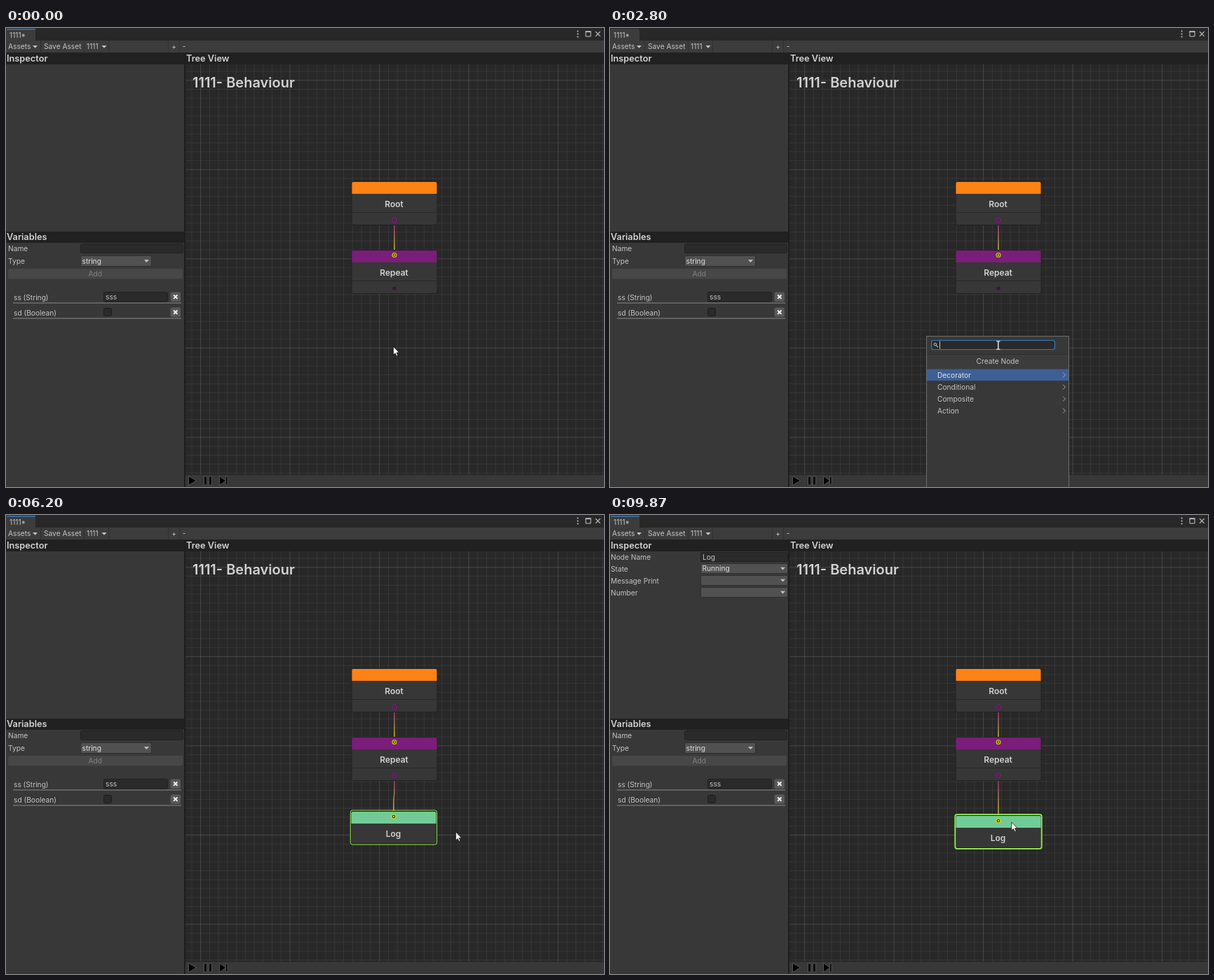
Animation, 853 px wide and 656 px high, one loop 9.94 s. Source, as an HTML page with a canvas:

```html
<!DOCTYPE html>
<html lang="en">
<head>
<meta charset="utf-8">
<title>Behaviour tree editor</title>
<style>
html, body { margin: 0; width: 853px; height: 656px; overflow: hidden; background: #383838; }
canvas { display: block; }
</style>
</head>
<body>
<canvas id="stage" width="853" height="656"></canvas>
<script>
const ctx = document.getElementById('stage').getContext('2d');
const LOOP = 9940, TICK = 200 / 3;
const PURPLE = '#861a86', YELLOW = '#c9da12', GREEN = '#8ce04e';

// Pointer and Log port positions: [time, x, y]
const POINTER = [
  [263, 552.5, 455.3], [930, 550.5, 374], [1003, 550.5, 374], [1270, 550.5, 378],
  [1730, 552, 444], [1803, 552, 444], [2070, 553, 455], [5533, 553, 455],
  [5730, 679, 450], [5800, 679, 450], [6670, 594, 457], [6870, 594, 457],
  [7200, 594.5, 459], [7470, 602.5, 471], [8400, 602.5, 471], [8470, 603, 472],
  [8670, 603, 476], [8870, 603, 476], [9070, 599, 466], [9600, 599, 466], [9870, 572.5, 438.8]
];
const LOG = [
  [7200, 553, 431], [7470, 561, 442], [8400, 561, 442], [8470, 561.5, 443],
  [8670, 561.5, 447], [8870, 561.5, 447], [9070, 554, 437]
];

function at(keys, t) {
  if (t <= keys[0][0]) return keys[0].slice(1);
  const i = keys.findIndex(k => k[0] > t);
  if (i < 0) return keys[keys.length - 1].slice(1);
  const [t0, x0, y0] = keys[i - 1], [t1, x1, y1] = keys[i];
  let p = (t - t0) / (t1 - t0);
  if (t1 - t0 > 400) p = p * p * (3 - 2 * p);
  return [x0 + (x1 - x0) * p, y0 + (y1 - y0) * p];
}

function box(x, y, w, h, fill, stroke, r = 0, lw = 1) {
  ctx.beginPath();
  ctx.roundRect(x, y, w, h, r);
  if (fill) { ctx.fillStyle = fill; ctx.fill(); }
  if (stroke) { ctx.strokeStyle = stroke; ctx.lineWidth = lw; ctx.stroke(); }
}

function text(s, x, y, { size = 10.2, weight = 400, color = '#c4c4c4', align = 'left' } = {}) {
  ctx.font = `${weight} ${size}px Inter, sans-serif`;
  ctx.fillStyle = color;
  ctx.textAlign = align;
  ctx.fillText(s, x, y);
}

function path(points, { fill, stroke, lw = 1, close = false }) {
  ctx.beginPath();
  points.forEach(([x, y]) => ctx.lineTo(x, y));
  if (close) ctx.closePath();
  if (fill) { ctx.fillStyle = fill; ctx.fill(); }
  if (stroke) { ctx.strokeStyle = stroke; ctx.lineWidth = lw; ctx.stroke(); }
}

const line = (x0, y0, x1, y1, stroke, lw = 1) => path([[x0, y0], [x1, y1]], { stroke, lw });

function cross(x, y, r, color, lw) {
  line(x - r, y - r, x + r, y + r, color, lw);
  line(x + r, y - r, x - r, y + r, color, lw);
}

function triangle(x, y) {
  path([[x - 3.5, y - 1.8], [x + 3.5, y - 1.8], [x, y + 2]], { fill: '#c4c4c4' });
}

function header(s, x, y, w) {
  box(x, y, w, 16, '#212121');
  text(s, x + 1, y + 12.3, { size: 12.75, weight: 600, color: '#d2d2d2' });
}

function field(x, y, w, h, s = '') {
  box(x + .5, y + .5, w - 1, h - 1, '#2a2a2a', '#212121', 2);
  text(s, x + 3, y + h / 2 + 3.7);
}

function dropdown(x, y, w, h, s = '') {
  box(x + .5, y + .5, w - 1, h - 1, '#515151', '#303030', 2);
  text(s, x + 2.5, y + h / 2 + 3.6, { color: '#e0e0e0' });
  triangle(x + w - 7.5, y + h / 2);
}

function drawGrid() {
  box(256, 52, 597, 586, '#282828');
  const tint = a => `rgba(193,196,192,${a})`;
  for (let i = -2; i < 46; i++) {
    const a = i % 10 ? .09 : .2, x = 277.7 + i * 12.745, y = 74.8 + i * 12.755;
    if (x > 256) line(x, 52, x, 638, tint(a));
    if (y > 52 && y < 638) line(256, y, 853, y, tint(a));
  }
}

function drawWindow(focused) {
  box(0, 0, 853, 18, '#282828');
  box(0, 1, 42, 17, '#3c3c3c', null, [3, 3, 0, 0]);
  if (focused) box(1, 1, 41, 1.6, '#3a79bb');
  text('1111*', 5, 14);
  [4.5, 8.5, 12.5].forEach(y => box(814.7, y - .9, 1.8, 1.8, '#c4c4c4'));
  box(827, 5, 7, 7, null, '#c4c4c4');
  box(826.5, 4.5, 8, 1.6, '#c4c4c4');
  cross(844.3, 8.5, 3.3, '#c4c4c4', 1.2);

  box(0, 18, 853, 17, '#3c3c3c');
  line(0, 35.5, 853, 35.5, '#232323');
  text('Assets', 3, 30.3);
  triangle(41.5, 26.7);
  text('Save Asset', 54, 30.3);
  text('1111', 115, 30.3);
  triangle(140, 26.7);
  [49.5, 111.5, 146.5, 231.5, 247.5].forEach(x => line(x, 18, x, 35, '#303030'));
  text('+', 239.5, 30, { align: 'center' });
  text('-', 254, 30, { align: 'center' });
}

function drawSidebar(inspecting) {
  box(0, 36, 254, 620, '#383838');
  header('Inspector', 0, 36, 254);
  if (inspecting) {
    ['Node Name', 'State', 'Message Print', 'Number'].forEach((s, i) => text(s, 1, 63.8 + i * 17));
    field(129, 53, 125, 14, 'Log');
    ['Running', '', ''].forEach((s, i) => dropdown(129, 69 + i * 17, 125, 15, s));
  }
  header('Variables', 0, 291, 254);
  text('Name', 3, 319);
  field(106, 308, 147, 14);
  text('Type', 3, 336.7);
  dropdown(106, 325, 102, 16, 'string');
  box(3, 344, 249, 14.5, '#474747', null, 2);
  text('Add', 127.3, 355, { color: '#828282', align: 'center' });
  ['ss (String)', 'sd (Boolean)'].forEach((s, i) => {
    const y = 384.5 + i * 22;
    text(s, 11, y + 4);
    box(234.5, y - 7, 14.5, 13.5, '#585858', null, 2);
    cross(241.8, y - .3, 2.7, '#f0f0f0', 2);
    line(10, y + 8.5, 250, y + 8.5, '#8a8a8a');
  });
  field(139, 377, 92, 15, 'sss');
  box(139.5, 400.5, 11, 11, '#2a2a2a', '#1c1c1c', 2);
  box(254, 36, 2, 620, '#1e1e1e');
}

function drawFooter() {
  box(256, 638, 597, 18, '#383838');
  line(256, 638.5, 853, 638.5, '#2a2a2a');
  const icon = { fill: '#000', stroke: '#777', lw: .6, close: true };
  path([[260.5, 640.5], [271.5, 647], [260.5, 653.5]], icon);
  box(282.5, 641, 4, 12, '#000', '#777', 0, .6);
  box(289.5, 641, 4, 12, '#000', '#777', 0, .6);
  path([[304.5, 640.5], [313.5, 647], [304.5, 653.5]], icon);
  box(313.5, 641, 2.5, 12, '#000', '#777', 0, .6);
}

function port(x, y, color, connected, dim) {
  ctx.globalAlpha = dim ? .45 : 1;
  if (connected && !dim) {
    box(x - 2.9, y - 2.9, 5.8, 5.8, '#242424', color, 3, 1.2);
    box(x - 1.3, y - 1.3, 2.6, 2.6, color, null, 1.3);
  } else {
    box(x - 2.4, y - 2.4, 4.8, 4.8, dim ? color : '#4c0c4e', '#222', 2.4, .6);
  }
  ctx.globalAlpha = 1;
}

function edge(x0, y0, x1, y1, endColor) {
  const bend = Math.max(0, Math.min(24, (y1 - y0) / 2));
  const g = ctx.createLinearGradient(0, y0, 0, y1);
  g.addColorStop(0, '#9c1f8c');
  g.addColorStop(1, endColor);
  path([[x0, y0], [x0, y0 + bend], [x1, y1 - bend], [x1, y1]], { stroke: g, lw: 1.5 });
}

function drawNode(name, cx, y, color, bodyHeight) {
  const x = cx - 60.5;
  box(x - .5, y - .5, 122, bodyHeight + 18, '#373737', '#222', 2.5);
  box(x, y, 121, 17, color, null, [2, 2, 0, 0]);
  if (bodyHeight > 30) line(x, y + 43.5, x + 121, y + 43.5, '#272727');
  text(name, cx - .5, y + 35.6, { size: 12, weight: 600, color: '#d2d2d2', align: 'center' });
}

function outline(cx, y, h, width, color = GREEN) {
  box(cx - 62 + .3, y - 2, 123.4, h + 4, null, color, 3, width);
}

function drawArrow(x, y) {
  const shape = [[0, 0], [0, 11.8], [2.7, 9.4], [4.5, 13.4], [6.5, 12.5], [4.7, 8.6], [8.4, 8.6]];
  path(shape.map(([dx, dy]) => [x + dx, y + dy]), { fill: '#fff', stroke: '#111', lw: .8, close: true });
}

function drawSearch(t) {
  const query = 'log'.slice(0, t < 3790 ? 0 : t < 3990 ? 1 : t < 4190 ? 2 : 3);
  const items = !query ? ['Decorator', 'Conditional', 'Composite', 'Action']
    : query === 'l' ? ['Log', 'Fail', 'Flip'] : ['Log'];
  box(451.5, 440.5, 203, 220, '#383838', '#6e6e6e');
  line(452, 466.5, 654, 466.5, '#2c2c2c');
  box(452, 467, 202, 20, '#3c3c3c');
  box(458.5, 446.5, 176, 13, '#2a2a2a', '#3a79bb', 3, 1.2);
  box(462, 450.3, 3.6, 3.6, null, '#c4c4c4', 2);
  line(465.3, 453.7, 467.8, 456.2, '#c4c4c4', 1.2);
  text(query, 470, 456.7, { color: '#d2d2d2' });
  const caret = 470.5 + ctx.measureText(query).width;
  line(caret, 447.5, caret, 458.5, '#c8c8c8');
  text(query ? 'Search' : 'Create Node', 553, 480.2, { align: 'center' });
  box(452, 487.5, 202, 16.5, '#3e5f96');
  items.forEach((s, i) => {
    const y = 496 + i * 17;
    text(s, 467, y + 3.7, { color: i ? '#c4c4c4' : '#e4e4e4' });
    if (!query) path([[646, y - 3.5], [649.5, y], [646, y + 3.5]], { stroke: '#a8a8a8' });
  });
  line(553.8, 448, 553.8, 459, '#fff', 1.3);
  line(551, 447.8, 556.5, 447.8, '#fff');
  line(551, 459.2, 556.5, 459.2, '#fff');
}

function draw(t) {
  const searching = t > 2790 && t < 4725;
  const linking = t > 1060 && t < 2790;
  const created = t > 4725;
  const snapped = t > 8925;
  const dragging = t > 6925 && t < 9525;
  const [px, py] = at(POINTER, t);
  let [lx, ly] = at(LOG, t);
  if (snapped) lx = 554;

  drawGrid();
  text('1111- Behaviour', 266, 85.2, { size: 20, weight: 600, color: '#d2d2d2' });

  edge(554, 275, 554, 324.5, YELLOW);
  if (created) edge(554, 372, lx, ly, YELLOW);
  drawNode('Root', 554, 220, '#ff8214', 44);
  drawNode('Repeat', 554, 318, '#7b1d7b', 44);
  port(554, 274.7, PURPLE, true, linking);
  port(554, 324.5, YELLOW, true, linking);
  port(554, 372.3, PURPLE, created, false);

  const over = (cx, y, h) => Math.abs(px - cx) < 62 && py > y - 2 && py < y + h + 2;
  if (!linking && !created && !searching && over(554, 318, 61)) outline(554, 318, 61, 1, 'rgba(140,224,78,.6)');
  if (linking) edge(554, 372, px, py, '#9c1f8c');

  if (created) {
    drawNode('Log', lx, ly - 7, '#72cb97', 28);
    port(lx, ly, YELLOW, true, false);
    const hovered = t > 5590 && !dragging && over(lx, ly - 7, 45);
    outline(lx, ly - 7, 45, hovered ? 2 : 1);
  }
  if (snapped && dragging) {
    [492, 554, 616].forEach(x => line(x, 218, x, ly + 39, 'rgba(68,192,255,.6)'));
  }

  header('Tree View', 256, 36, 597);
  drawSidebar(t > 6925);
  drawFooter();
  drawWindow(!searching);
  if (searching) drawSearch(t);
  else drawArrow(px, py);
}

const start = performance.now();
function frame() {
  const t = (performance.now() - start) % LOOP;
  draw(Math.floor((t + 4) / TICK) * TICK);
  requestAnimationFrame(frame);
}
frame();
</script>
</body>
</html>
```
